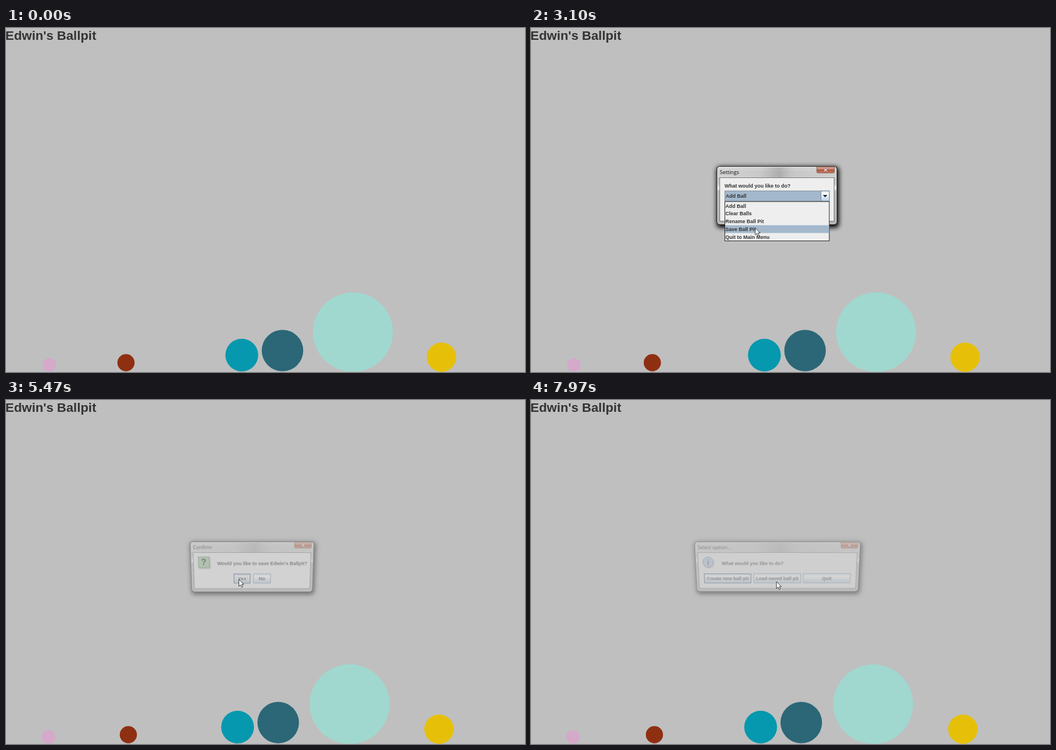
An HTML page that plays this animation: 917x610 px, repeating every 8000 ms.

```html
<!DOCTYPE html>
<html lang="en">
<head>
<meta charset="utf-8">
<title>Ballpit</title>
<style>
html, body { margin: 0; width: 100%; height: 100%; overflow: hidden; background: #bfbfbf; }
#stage { position: relative; width: 100%; height: 100%; overflow: hidden; contain: strict; }
svg { position: absolute; left: 0; top: 0; width: 917px; height: 610px; overflow: hidden; }
text { font: bold 9px "Liberation Sans", Arial, sans-serif; fill: #333; }
.heading { font-size: 22.7px; }
.caption { font: 9.2px "Open Sans", "Noto Sans", sans-serif; fill: #111; }
.mid { text-anchor: middle; }
.dialog { opacity: 0; }
</style>
</head>
<body>
<div id="stage">
<svg>
  <defs>
    <linearGradient id="glass" x2="0" y2="1">
      <stop stop-color="#d0d0d0"/><stop offset=".1" stop-color="#c3c3c3"/>
      <stop offset=".3" stop-color="#c6c6c6"/><stop offset=".38" stop-color="#f2f2f2"/>
      <stop offset=".42" stop-color="#b9b9b9"/><stop offset="1" stop-color="#b3b3b3"/>
    </linearGradient>
    <linearGradient id="sheen">
      <stop stop-color="#fff" stop-opacity=".25"/><stop offset=".35" stop-color="#fff" stop-opacity=".1"/>
      <stop offset=".52" stop-color="#000" stop-opacity=".12"/><stop offset=".65" stop-color="#fff" stop-opacity=".08"/>
      <stop offset="1" stop-color="#fff" stop-opacity=".2"/>
    </linearGradient>
    <linearGradient id="metal" x2="0" y2="1">
      <stop stop-color="#dde8f3"/><stop offset=".3" stop-color="#fff"/>
      <stop offset=".5" stop-color="#e6eef6"/><stop offset="1" stop-color="#b8cfe5"/>
    </linearGradient>
    <linearGradient id="red" x2="0" y2="1">
      <stop stop-color="#dcaa9b"/><stop offset=".45" stop-color="#cb8370"/>
      <stop offset=".5" stop-color="#b5543c"/><stop offset="1" stop-color="#cb7c5e"/>
    </linearGradient>
    <filter id="blur" x="-20%" y="-30%" width="140%" height="160%"><feGaussianBlur stdDeviation="4"/></filter>
    <filter id="soft" x="-30%" y="-30%" width="160%" height="160%"><feGaussianBlur stdDeviation="1"/></filter>
  </defs>
  <text class="heading" x="-1" y="20.6">Edwin's Ballpit</text>
  <g id="balls"></g>
</svg>
</div>
<script>
const LOOP = 8000;
const OWNER = "Edwin's Ballpit";
const clamp = v => Math.max(0, Math.min(1, v));
const $ = id => document.getElementById(id);
const add = (parent, html) => {
  parent.insertAdjacentHTML('beforeend', html);
  return parent.lastElementChild;
};

// Drawing helpers
const rect = (x, y, w, h, attrs) => `<rect x="${x}" y="${y}" width="${w}" height="${h}" ${attrs}/>`;
const label = (x, y, s, cls = '') => `<text class="${cls}" x="${x}" y="${y}">${s}</text>`;

function button(x, y, w, s, focus) {
  const half = s.length * 2.4 + 3;
  return rect(x + .5, y + .5, w - 1, 18, 'fill="url(#metal)" stroke="#7a8a99"') +
    (focus ? rect(x + 1, y + 1, w - 2, 17.5, 'fill="none" stroke="#667c96" stroke-width="1.8"') : '') +
    (focus === 'ring' ? rect(x + w / 2 - half, y + 4, half * 2, 11.5, 'fill="none" stroke="#a3b8cc" stroke-width=".8"') : '') +
    label(x + w / 2, y + 13, s, 'mid');
}

function dialog(title, x, y, w, h, open, close, body) {
  const cx = x + w - 36, cw = w - 10;
  const cross = `<path d="M${cx + 13} ${y + 4.5}l5 4.6m0-4.6l-5 4.6" `;
  const html = rect(x, y + 1, w + 3, h + 4, 'rx="6" filter="url(#blur)"') +
    rect(x + .5, y + .5, w - 1, h - 1, 'rx="5" fill="url(#glass)" stroke="#2b2b2b" stroke-width="1.2"') +
    rect(x + 1.5, y + 1.5, w - 3, h - 3, 'rx="4" fill="none" stroke="#fff" stroke-opacity=".5"') +
    rect(x + 2, y + 2, w - 4, 18, 'fill="url(#sheen)"') +
    rect(x + 5.5, y + 20.5, cw - 1, h - 27, 'fill="#eee" stroke="#777"') +
    `<path d="M${cx} ${y + 1}h31v9q0 2-2 2h-27q-2 0-2-2z" fill="url(#red)" stroke="#6b4a42" stroke-width=".8"/>` +
    cross + 'stroke="#633" stroke-width="2.4"/>' + cross + 'stroke="#fff" stroke-width="1.4"/>' +
    label(x + 5.5, y + 14, title, 'caption') + body;
  const el = add($('stage'),
    `<svg class="dialog" style="transform-origin:${x + w / 2}px ${y + h / 2}px">${html}</svg>`);
  return { el, open, close };
}

// Balls: start centre, speed in px/s, radius, centre height, colour
const balls = [
  [76.5, -.27, 12, 597.5, '#d4a9ca'], [212, .76, 15.2, 593.5, '#8f2f11'],
  [416.6, -1.36, 29, 580, '#0598ae'], [488.5, -1.38, 36.7, 572, '#2b6777'],
  [613, -1.06, 70.5, 539.3, '#a0d8cf'], [769.5, -.8, 26, 583.7, '#e6c008']
].map(([x, v, r, y, fill]) =>
  ({ x, v, el: add($('balls'), `<circle cy="${y}" r="${r}" fill="${fill}"/>`) }));

// Settings menu
const ROW = 13.8, ROW_TOP = 308.3;
const options = ['Add Ball', 'Clear Balls', 'Rename Ball Pit', 'Save Ball Pit', 'Quit to Main Menu'];
const combo = rect(342.5, 289, 184.5, 18, 'fill="#a3b8cc" stroke="#7a8a99"') +
  rect(512.5, 289, 14.5, 18, 'fill="url(#metal)" stroke="#7a8a99"') +
  '<path d="M515.7 296h8l-4 4.3z" fill="#222"/>' +
  '<text id="choice" x="344" y="301"></text>';
const popup = '<g id="popup">' +
  rect(342.5, 307.8, 184.5, 69.7, 'fill="#eee" stroke="#222"') +
  rect(343, ROW_TOP, 183.5, ROW, 'id="row" fill="#a3b8cc"') +
  options.map((s, i) => label(343.5, 318.6 + i * ROW, s)).join('') + '</g>';
const question = rect(336, 280, 21, 21, 'fill="#777" opacity=".6" filter="url(#soft)"') +
  rect(334.5, 278.5, 20.5, 20.5, 'fill="#9dc99b" stroke="#5c7d5c"') +
  '<text class="mid" x="344.7" y="294.3" style="font-size:16px;fill:#111">?</text>';
const info = '<circle cx="306" cy="290" r="10" fill="#777" opacity=".6" filter="url(#soft)"/>' +
  '<circle cx="305" cy="288.5" r="9.7" fill="#b4c6e0" stroke="#5b78a8"/>' +
  '<text class="mid" x="305" y="294" style="font-size:15px;fill:#3d5a8c">i</text>';

const dialogs = [
  dialog('Settings', 328, 245, 213, 104, 1190, 4070,
    label(342, 283.4, 'What would you like to do?') + combo +
    button(386, 315, 46, 'OK', true) + button(437, 315, 47, 'Cancel') + popup),
  dialog('Confirm', 320, 250, 229.5, 95.5, 4200, 5400,
    question + label(369.5, 294.3, `Would you like to save ${OWNER}?`) +
    button(400, 310, 32, 'Yes', 'ring') + button(437, 310, 33, 'No')),
  dialog('Saving...', 330, 250, 210, 95.5, 5530, 6640,
    label(342.5, 294.3, `Attempting to save ${OWNER}...`) + button(420, 310, 29, 'OK', 'ring')),
  dialog('Success!', 330, 250, 210, 95.5, 6750, 7790,
    label(342.5, 294.3, `Successfully saved ${OWNER}!`) + button(420, 310, 29, 'OK', 'ring')),
  dialog('Select option...', 281, 250, 309, 95.5, 7890, 9000,
    info + label(330.5, 294.3, 'What would you like to do?') +
    button(296, 310, 90, 'Create new ball pit', true) + button(390, 310, 90, 'Load saved ball pit') +
    button(484, 310, 90, 'Quit'))
];

// Pointer stops: time, x, y
const path = [
  [490, 424, 614], [700, 417, 503], [850, 410, 460], [1000, 405, 425], [1270, 402, 380],
  [1500, 400, 350], [2090, 388.5, 297], [2480, 388.5, 297], [2920, 394, 338], [3260, 398, 369],
  [3450, 398, 369], [3800, 404.5, 333], [4300, 404.5, 333], [4420, 404.7, 334.3], [4650, 404.7, 334.3],
  [5060, 411.5, 318], [5960, 411.5, 318], [6200, 432, 320], [6400, 433, 320], [7390, 433, 320], [7570, 433.7, 322]
];
const clicks = [[2200, 2480], [3380, 3500], [3980, 4080], [5120, 5330], [6580, 6640], [7780, 7840]];

add($('stage'),
  '<svg><g id="pointer"><circle id="glow" r="10" cy=".5" fill="#dcdc46" fill-opacity=".8"/>' +
  '<path d="M0 0V12.3L2.8 9.8 4.8 14 6.9 13 4.9 9H8.7Z" fill="#fff" stroke="#222" stroke-width=".9"/></g></svg>');

function pointerAt(t) {
  const i = path.findIndex(p => p[0] > t);
  if (i < 0) return path[path.length - 1].slice(1);
  if (i === 0) return path[0].slice(1);
  const [t0, x0, y0] = path[i - 1], [t1, x1, y1] = path[i];
  const k = (t - t0) / (t1 - t0);
  return [x0 + (x1 - x0) * k, y0 + (y1 - y0) * k];
}

function render(t) {
  for (const b of balls) b.el.setAttribute('cx', b.x + b.v * t / 1000);

  for (const d of dialogs) {
    const p = Math.min(clamp((t - d.open) / 240), clamp((d.close + 120 - t) / 120));
    const q = 1 - p;
    d.el.style.opacity = p;
    d.el.style.transform = q ?
      `translateY(${-2.5 * q}px) perspective(440px) rotateX(${-13 * q}deg) scale(${1 - .095 * q})` : 'none';
  }

  const [x, y] = pointerAt(t);
  $('pointer').setAttribute('transform', `translate(${x} ${y})`);
  $('glow').style.display = clicks.some(([a, b]) => t >= a && t < b) ? '' : 'none';

  const row = Math.max(0, Math.min(4, Math.floor((y - ROW_TOP) / ROW)));
  $('row').setAttribute('y', ROW_TOP + row * ROW);
  $('popup').style.display = t >= 2310 && t < 3440 ? '' : 'none';
  $('choice').textContent = options[t < 3440 ? 0 : 4];
}

const start = performance.now();
function tick() {
  render((performance.now() - start) % LOOP);
  requestAnimationFrame(tick);
}
tick();
</script>
</body>
</html>
```
